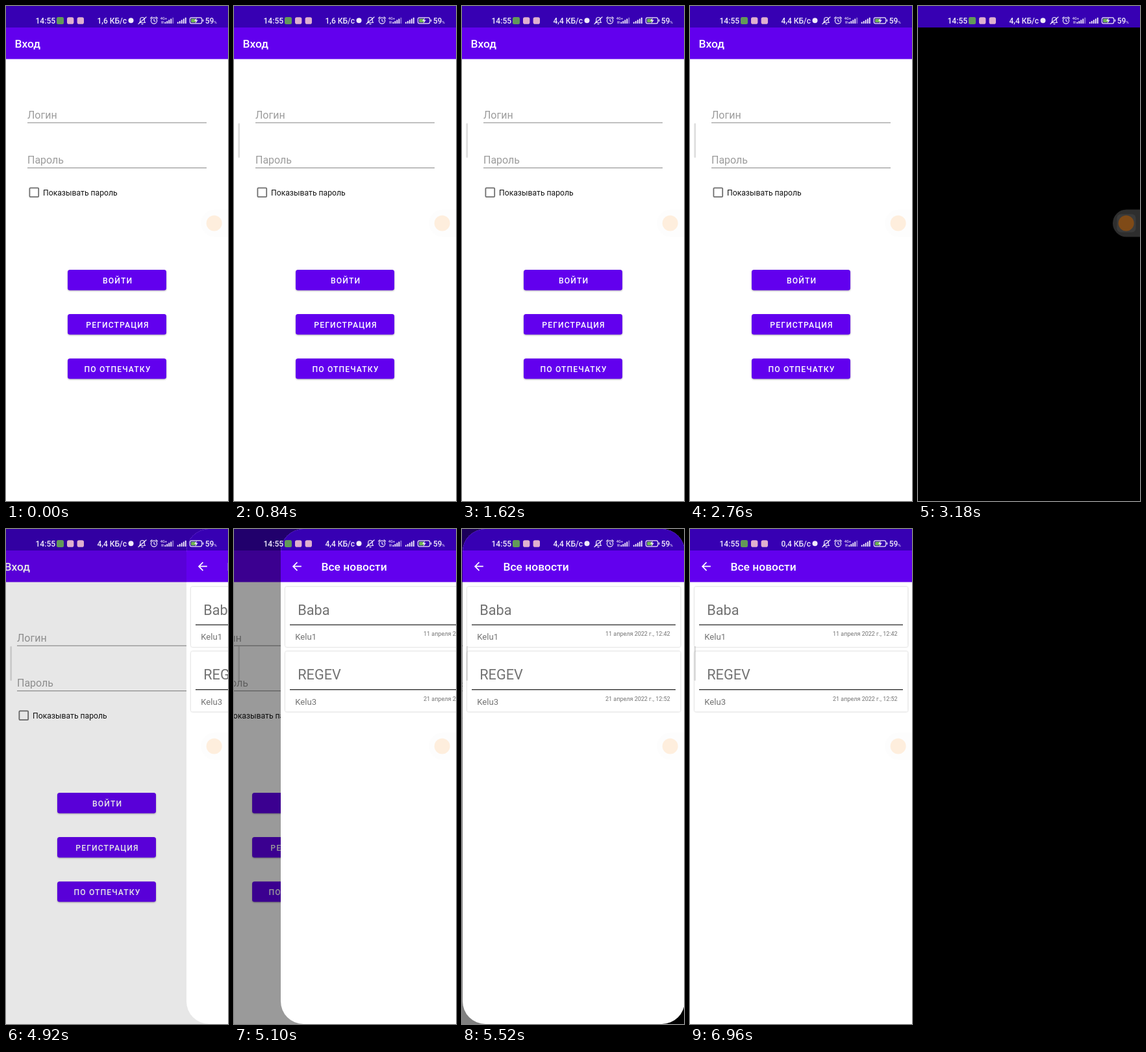
Animation of 342x760 px, one loop 7.02 s. Source, as an HTML page:

```html
<!DOCTYPE html>
<html lang="ru">
<head>
<meta charset="utf-8">
<title>Вход</title>
<style>
  html, body { margin: 0; width: 100%; height: 100%; overflow: hidden; background: #000; }
  svg { display: block; width: 342px; height: 760px; font-family: Roboto, "Noto Sans", sans-serif; }
  .title { font-size: 17.4px; font-weight: 500; fill: #fff; }
  .hint { font-size: 16px; fill: #9c9c9c; }
  .btn { filter: drop-shadow(0 1px 1px rgba(0, 0, 0, .3)); }
  .label { font-size: 12.2px; font-weight: 500; letter-spacing: .089em; fill: #fff; text-anchor: middle; }
  .card { fill: #fff; filter: drop-shadow(0 .6px 1px rgba(0, 0, 0, .28)); }
  .head { font-size: 21.7px; fill: #737373; }
  .author { font-size: 13.1px; fill: #737373; }
  .date { font-size: 9px; fill: #737373; text-anchor: end; }
  .status { font-size: 12.1px; font-weight: 500; fill: #f0eafa; }
  .line { fill: none; stroke: #f0eafa; stroke-width: 1.2; stroke-linecap: round; stroke-linejoin: round; }
  .pill { fill: #000; fill-opacity: .008; }
  .tile { fill: none; }
  .dot { fill: #feeedd; }
  .dark .pill { fill: #2e2e2e; fill-opacity: 1; }
  .dark .tile { fill: #3b3b3b; }
  .dark .dot { fill: #7f4a17; }
</style>
</head>
<body>
<svg viewBox="0 0 342 760">
  <defs>
    <clipPath id="corners"><rect id="frame" width="342" height="760"/></clipPath>
    <g id="bars">
      <rect width="342" height="760" fill="#fff"/>
      <rect width="342" height="81.5" fill="#6200ee"/>
      <rect width="342" height="33" fill="#3700b3"/>
    </g>
  </defs>

  <g id="login">
    <use href="#bars"/>
    <text class="title" x="13.5" y="64.3">Вход</text>
    <text class="hint" x="33" y="172.7">Логин</text>
    <text class="hint" x="33" y="242.3">Пароль</text>
    <path d="M33 179.2H309M33 248.6H309" stroke="#858585"/>
    <rect x="36.4" y="279.4" width="13.8" height="13.8" rx="1.2" fill="none" stroke="#6f6f6f" stroke-width="1.8"/>
    <text x="57" y="290.8" font-size="12.2" fill="#111">Показывать пароль</text>
    <g id="buttons"></g>
  </g>
  <rect id="dim" width="342" height="760" opacity="0"/>

  <g id="news">
    <g clip-path="url(#corners)">
      <use href="#bars"/>
      <path transform="translate(14.4 47) scale(.871)" fill="#fff"
        d="M20 11H7.83l5.59-5.59L12 4l-8 8 8 8 1.41-1.41L7.83 13H20z"/>
      <text class="title" x="62.5" y="64.3">Все новости</text>
      <g id="cards"></g>
    </g>
  </g>

  <rect id="secure" y="33" width="342" height="727"/>
  <rect id="handle" x="6.3" y="180" width="2.7" height="53" rx="1.3" fill-opacity=".13"/>

  <g id="bubble">
    <path class="pill" d="M342 312.5H321a21 21 0 0 0 0 42H342z"/>
    <rect class="tile" x="306.5" y="319.5" width="29" height="28" rx="6"/>
    <circle class="dot" cx="320.7" cy="333.6" r="12"/>
  </g>

  <g class="status">
    <text x="45.5" y="26.6">14:55</text>
    <rect x="78" y="17" width="11" height="11" rx="2.5" fill="#639a58"/>
    <rect x="94" y="17.3" width="10.4" height="10.4" rx="2.8" fill="#dfb0cf"/>
    <rect x="109.6" y="17.3" width="10.4" height="10.4" rx="2.8" fill="#dfb0cf"/>
    <text id="speed" x="140.5" y="26.6" font-size="12"></text>
    <circle cx="192.5" cy="22.2" r="4"/>
    <path class="line" d="M205.5 25.5h9l-1.3-2v-3c0-4-6.4-4-6.4 0v3zM209 27.6h2M204 27.5L216 17"/>
    <circle class="line" cx="228" cy="22.5" r="4.6"/>
    <path class="line" d="M228 20v2.8l1.8 1M222.6 18.8l2.4-2M233.4 18.8l-2.4-2"/>
    <text x="237.8" y="20.6" font-size="5.6">4G+</text>
    <path class="line" stroke-width=".8" d="M240 23.5v3M242 23.5v3" style="stroke-width:.9"/>
    <g id="signal"></g>
    <rect class="line" x="283.3" y="17.8" width="18.4" height="9" rx="2.4"/>
    <rect x="285" y="19.4" width="8" height="5.8" rx="1" fill="#6fb552"/>
    <rect x="302.8" y="20.6" width="1.4" height="3.4" rx=".6"/>
    <path d="M294 17.8l-4 5.2h2.6l-1 4 4.2-5.4h-2.7z"/>
    <text x="306.7" y="26.6">59</text>
    <text x="320.2" y="26.6" font-size="6.2">%</text>
  </g>
</svg>
<script>
  const LOOP = 7020, STEP = 60, W = 342;
  const HANDLE_AT = 240, SECURE = [2880, 4620], SLIDE_AT = 4854, STIFF = 0.0119;
  const SPEEDS = [[0, '1,6'], [1560, '4,4'], [5580, '0,4']];
  const $ = id => document.getElementById(id);

  $('buttons').innerHTML = ['ВОЙТИ', 'РЕГИСТРАЦИЯ', 'ПО ОТПЕЧАТКУ'].map((label, i) => {
    const y = 405 + 68.1 * i;
    return `<rect class="btn" x="95" y="${y}" width="152" height="31.4" rx="3.5" fill="#6200ee"/>
      <text class="label" x="172" y="${y + 20.6}">${label}</text>`;
  }).join('');

  $('cards').innerHTML = [
    ['Baba', 'Kelu1', '11 апреля 2022 г., 12:42'],
    ['REGEV', 'Kelu3', '21 апреля 2022 г., 12:52']
  ].map(([head, author, date], i) => `<g transform="translate(0 ${99.4 * i})">
      <rect class="card" x="7" y="88.7" width="328.5" height="92.3" rx="2.2"/>
      <text class="head" x="26.2" y="132">${head}</text>
      <path d="M14 147.2H328" stroke="#222" stroke-width="1.2"/>
      <text class="author" x="22.3" y="170.4">${author}</text>
      <text class="date" x="319.7" y="164.2">${date}</text>
    </g>`).join('');

  const signal = (x, lit) => [0, 1, 2, 3, 4].map(i => {
    const h = 2.4 + 1.7 * i;
    return `<rect x="${x + 3 * i}" y="${27 - h}" width="1.9" height="${h}" rx=".5" opacity="${i < lit ? 1 : .45}"/>`;
  }).join('');
  $('signal').innerHTML = signal(244.3, 4) + signal(263.8, 5);

  // Critically damped spring from 0 to 1
  function spring(ms) {
    const u = Math.max(0, ms * STIFF);
    return 1 - (1 + u) * Math.exp(-u);
  }

  function draw(t) {
    const x = Math.round(W * (1 - spring(t - SLIDE_AT)));
    const secure = t >= SECURE[0] && t < SECURE[1];
    const shift = Math.round((x - W) / 4);

    $('login').setAttribute('transform', `translate(${shift} 0)`);
    $('dim').setAttribute('opacity', 0.5 * (1 - x / W));
    $('news').setAttribute('transform', `translate(${x} 0)`);
    $('frame').setAttribute('rx', x ? 35 : 0);
    $('secure').style.display = secure ? '' : 'none';
    $('handle').style.display = t >= HANDLE_AT ? '' : 'none';
    $('bubble').setAttribute('class', secure ? 'dark' : '');
    $('speed').textContent = SPEEDS.filter(s => s[0] <= t).pop()[1] + ' КБ/с';
  }

  const start = performance.now();
  function tick() {
    const t = (performance.now() - start) % LOOP;
    draw(Math.floor(t / STEP) * STEP);
    requestAnimationFrame(tick);
  }
  tick();
</script>
</body>
</html>
```
